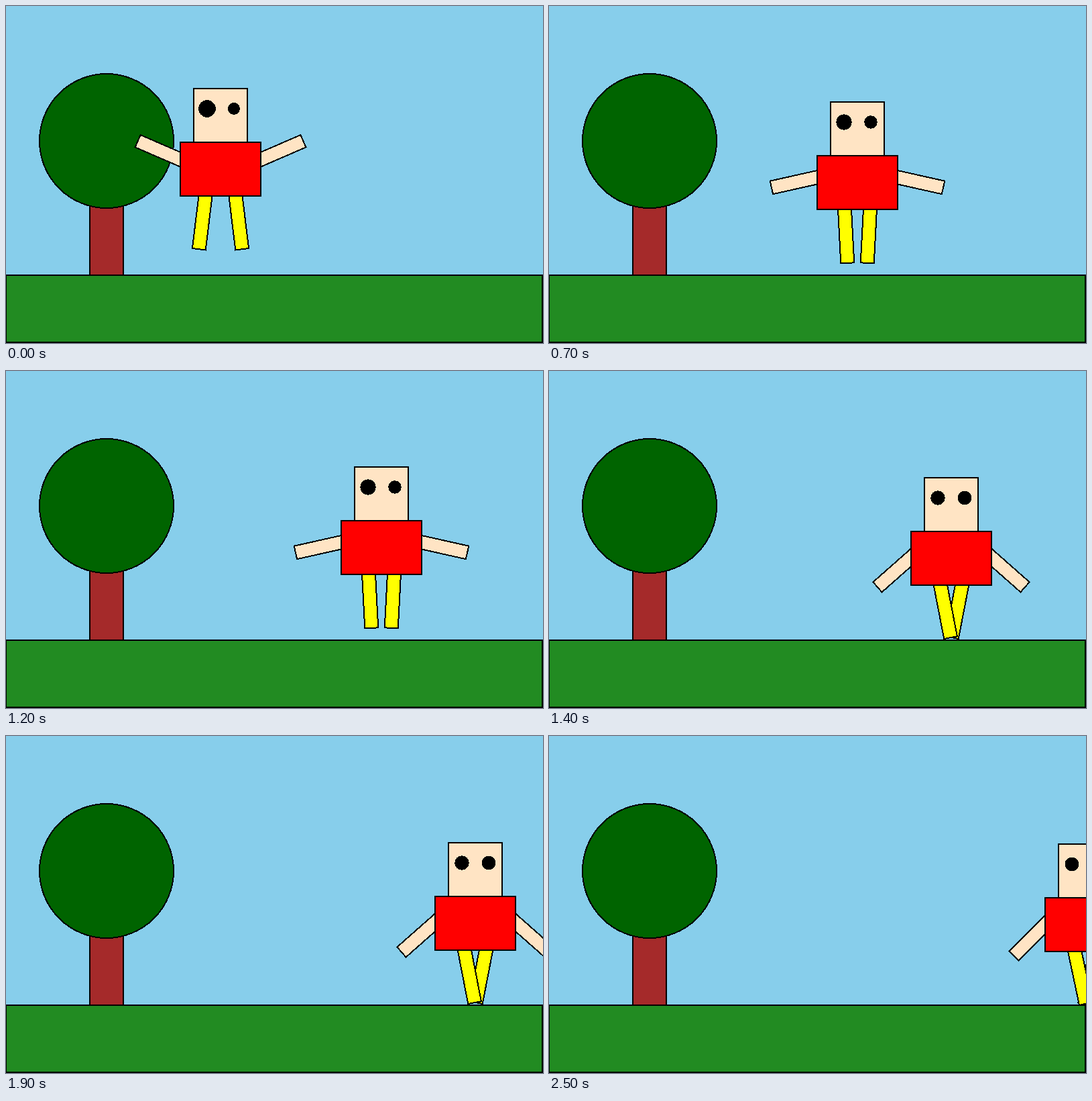
Write an HTML page that moves like this. It is 801x502 px and loops after 8000 ms.

```html
<!DOCTYPE html>
<html lang="en">
<head>
<meta charset="utf-8">
<title>Hopping figure</title>
<style>
  html, body { margin: 0; width: 100%; height: 100%; overflow: hidden; background: skyblue; }
  svg { display: block; width: 801px; height: 502px; background: skyblue; shape-rendering: crispEdges; }
  rect, circle { stroke: black; stroke-width: 2; }
  .skin { fill: bisque; }
  .leg { fill: yellow; }
  .eye { fill: black; stroke: none; }
</style>
</head>
<body>
<svg viewBox="0 0 801 502">
  <rect x="125" y="250" width="50" height="151" fill="brown"/>
  <circle cx="150" cy="201" r="100" fill="darkgreen"/>

  <!-- Origin: middle of the shoulder line -->
  <g id="figure">
    <rect id="armL" class="skin" x="-130" y="20" width="80" height="20"/>
    <rect id="armR" class="skin" x="50" y="20" width="80" height="20"/>
    <rect id="legR" class="leg" x="10" y="60" width="20" height="100"/>
    <rect id="legL" class="leg" x="-30" y="60" width="20" height="100"/>
    <rect class="skin" x="-40" y="-80" width="80" height="80"/>
    <rect x="-60" y="0" width="120" height="80" fill="red"/>
    <circle id="eyeL" class="eye" cx="-20" cy="-50"/>
    <circle id="eyeR" class="eye" cx="20" cy="-50"/>
  </g>

  <rect x="0" y="401" width="800" height="100" fill="forestgreen"/>
</svg>
<script>
  const LOOP = 8000, STEP = 100, LAST_STEP = 25;
  const el = id => document.getElementById(id);
  const [figure, armL, armR, legL, legR, eyeL, eyeR] =
    ['figure', 'armL', 'armR', 'legL', 'legR', 'eyeL', 'eyeR'].map(el);

  const turn = (part, angle, x, y) =>
    part.setAttribute('transform', `rotate(${angle} ${x} ${y})`);

  // Triangle wave between 0 and 50 with period 100
  const bounce = phase => 50 - Math.abs(50 - phase % 100);

  function pose(step) {
    const lift = step === LAST_STEP ? 0 : bounce(38 + 40 * step);
    const x = Math.min(800, 320 + 20 * step);
    const arm = 1.8 * lift - 45;
    const leg = 0.5 * lift - 12;

    figure.setAttribute('transform', `translate(${x} ${241 - lift})`);
    turn(armL, arm, -50, 30);
    turn(armR, -arm, 50, 30);
    turn(legL, leg, -20, 60);
    turn(legR, -leg, 20, 60);
    eyeL.setAttribute('r', 10.5 + 0.06 * lift);
    eyeR.setAttribute('r', 10.5 - 0.04 * lift);
  }

  const start = performance.now();
  function draw() {
    const time = Math.max(0, performance.now() - start) % LOOP;
    pose(Math.min(LAST_STEP, Math.floor(time / STEP)));
    requestAnimationFrame(draw);
  }
  draw();
</script>
</body>
</html>
```
